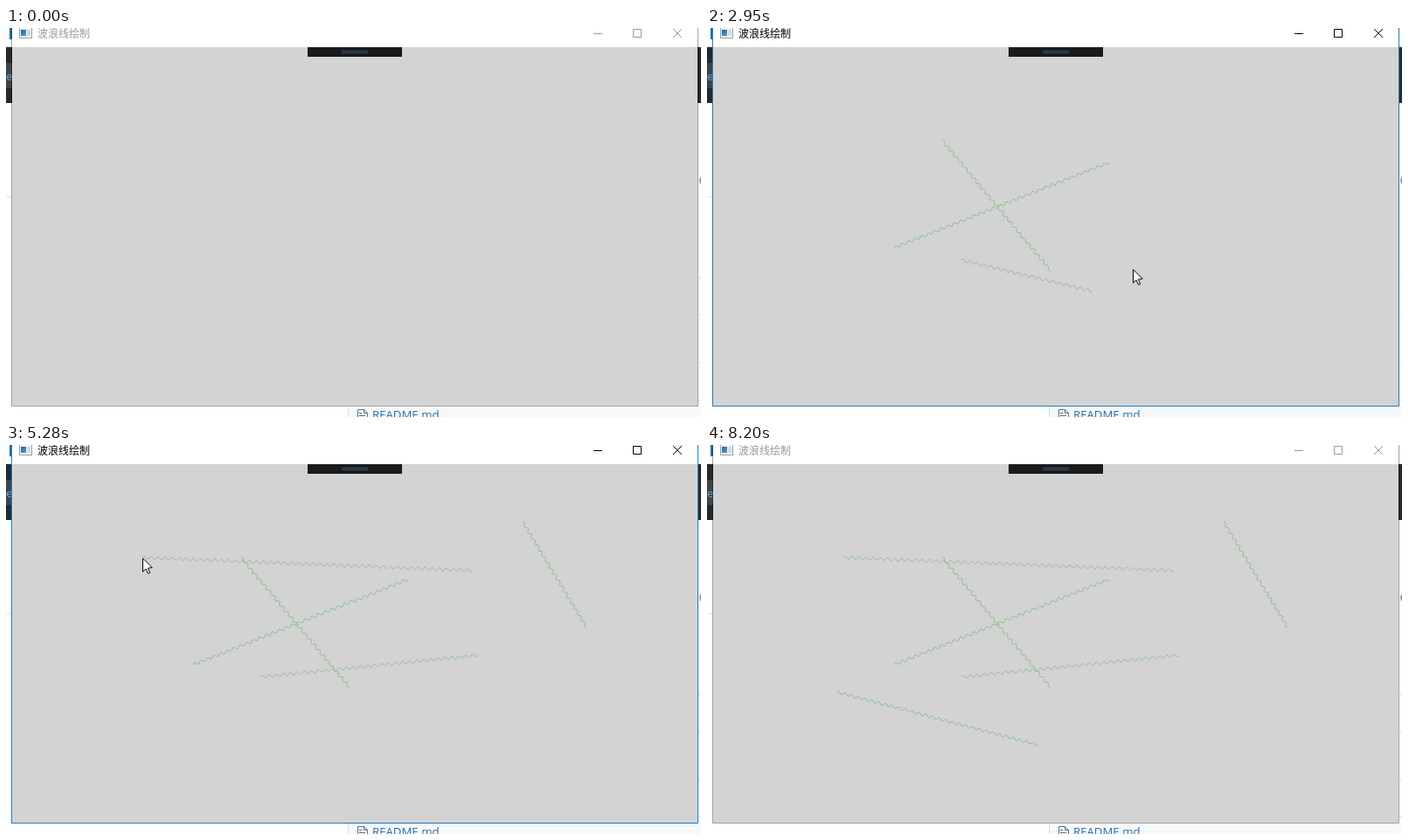
Recreate the animation shown at these times as an HTML page with a canvas. Size 795x446 px, loop 8270 ms.

```html
<!DOCTYPE html>
<html lang="zh">
<head>
<meta charset="utf-8">
<title>波浪线绘制</title>
<style>
html, body { margin: 0; width: 100%; height: 100%; overflow: hidden; background: #fff; }
canvas { display: block; }
</style>
</head>
<body>
<canvas id="stage" width="795" height="446"></canvas>
<script>
const ctx = document.getElementById('stage').getContext('2d');
const LOOP = 8270, TICK = 64;
const CLICK = 400, BLUR = 8200;

// The pointer's journey: each gesture goes on from where the last one ended
const gestures = [];
let spot = [640, 418];
function gesture(draws, from, to, x, y, ...via) {
  const steps = Math.round((to - from) / TICK);
  const path = [[from - TICK, ...spot], ...via, [to, x, y]];
  gestures.push({ from, steps, step: (to - from) / steps, draws, path });
  spot = [x, y];
}
const move = (...args) => gesture(false, ...args);
const drag = (...args) => gesture(true, ...args);

move(60, 395, 214, 252);
drag(460, 820, 460, 154);
move(1130, 1320, 393, 278);
drag(1640, 1960, 269, 129);
move(2210, 2390, 291, 266, [2210, 270, 146]);
drag(2640, 3090, 540, 241, [2830, 400, 316]);
move(3160, 3440, 664, 209);
drag(3510, 3760, 591, 88);
move(3960, 4080, 534, 144);
drag(4330, 5280, 156, 129, [4710, 240, 125], [4773, 238, 124]);
move(5530, 5720, 148, 283);
drag(5860, 7130, 379, 344, [5980, 275, 330], [6050, 350, 265], [6114, 336, 245],
  [6300, 230, 182], [6558, 56, 303], [6622, 61, 314], [6800, 130, 374]);
move(7440, 7830, 830, 462);

// Smooth curve through the way points, at rest at both ends
function along(path, t) {
  const last = path.length - 1;
  if (t <= path[0][0]) return path[0].slice(1);
  if (t >= path[last][0]) return path[last].slice(1);
  let i = 0;
  while (t > path[i + 1][0]) i++;
  const a = path[i], b = path[i + 1], d = b[0] - a[0], u = (t - a[0]) / d;
  const slope = (j, c) => j === 0 || j === last ? 0
    : (path[j + 1][c] - path[j - 1][c]) / (path[j + 1][0] - path[j - 1][0]);
  return [1, 2].map(c =>
    a[c] + (b[c] - a[c]) * u * u * (3 - 2 * u) +
    d * u * (1 - u) * (slope(i, c) * (1 - u) - slope(i + 1, c) * u));
}

function rect(x, y, w, h, color) {
  ctx.fillStyle = color;
  ctx.fillRect(x, y, w, h);
}

function text(str, x, y, font, color) {
  ctx.font = font;
  ctx.fillStyle = color;
  ctx.fillText(str, x, y);
}

function stroke(color, path) {
  ctx.strokeStyle = color;
  ctx.lineWidth = 1;
  ctx.stroke(new Path2D(path));
}

function drawPage() {
  rect(0, 0, 795, 446, '#fff');
  rect(4, 0, 3, 13, '#256f9e');
  rect(0, 21, 795, 1, '#dcdcdc');
  rect(0, 22, 795, 64, '#24292e');
  rect(0, 40, 7, 29, '#3f4448');
  text('se', -6, 60, '13px "Open Sans", sans-serif', '#6aa9d6');
  rect(0, 193, 7, 1, '#e1e4e8');
  for (const y of [286, 328, 383, 426]) rect(792, y, 3, 1, '#dfe2e5');
  ctx.beginPath();
  ctx.arc(799, 175, 6, 0, 7);
  ctx.fillStyle = '#999';
  ctx.fill();
  rect(391, 434, 404, 12, '#f6f8fa');
  rect(391, 434, 1, 12, '#d9dde1');
  stroke('#59718a', 'M402.5 450V437.5H409.5L413.5 441.5V450M409.5 437.5V441.5H413.5M404 441.5H407M404 444.5H411');
  text('README.md', 419, 448, '13.2px "Open Sans", sans-serif', '#2a6ca8');
}

function drawWindow(active) {
  const ink = active ? '#000' : '#999';
  // The idle border is see-through
  rect(6, 0, 786, 434, active ? '#1a7fc9' : 'rgba(0, 0, 0, 0.36)');
  rect(7, 0, 784, 22, '#fff');
  rect(7, 22, 784, 411, '#d3d3d3');

  rect(15, 0, 15, 12, '#9aa0a6');
  rect(16, 0, 13, 11, '#f1f3f5');
  const blue = ctx.createLinearGradient(17, 2, 23, 9);
  blue.addColorStop(0, '#2b62a8');
  blue.addColorStop(1, '#4ba3c3');
  rect(17, 2, 6, 7, blue);
  rect(24, 2, 4, 7, '#d5dade');
  text('波浪线绘制', 36, 11, '12px "Noto Sans CJK SC", "Noto Sans CJK", sans-serif', ink);

  rect(672, 6, 10, 1, ink);
  stroke(ink, 'M717.5 1.5h9v9h-9zM763 1l10 10M773 1l-10 10');

  rect(345, 22, 108, 11, '#1b1b1c');
  for (const y of [26, 28]) rect(384, y, 30, 1, '#35556d');
}

function drawWave([x0, y0], [x1, y1]) {
  const dx = x1 - x0, dy = y1 - y0, len = Math.hypot(dx, dy);
  if (len < 2) return;
  const halves = 2 * Math.max(1, Math.round(len / 8));
  const w = len / halves;
  ctx.save();
  ctx.translate(x0, y0);
  ctx.rotate(Math.atan2(dy, dx));
  ctx.beginPath();
  ctx.moveTo(0, 0);
  for (let i = 0; i < halves; i++) {
    const h = i % 2 ? 2 : -2;
    ctx.bezierCurveTo((i + 0.27) * w, h, (i + 0.73) * w, h, (i + 1) * w, 0);
  }
  ctx.strokeStyle = '#84bb84';
  ctx.lineWidth = 0.85;
  ctx.stroke();
  ctx.restore();
}

const ARROW = 'M.5 .9V16.3L4 13L6.5 18.4L8.7 17.5L6.4 12.2L11.2 11.6Z';
function drawPointer([x, y]) {
  ctx.save();
  ctx.translate(Math.round(x), Math.round(y));
  ctx.fillStyle = '#fff';
  ctx.fill(new Path2D(ARROW));
  stroke('#000', ARROW);
  ctx.restore();
}

function draw(t) {
  drawPage();
  drawWindow(t >= CLICK && t < BLUR);
  let pointer = null;
  for (const { from, steps, step, draws, path } of gestures) {
    if (t < from) break;
    const k = Math.min(steps, Math.floor((t - from) / step + 0.2));
    const now = from + k * step;
    pointer = along(path, now);
    // The line trails the pointer by one step until it settles
    if (draws) drawWave(path[0].slice(1), k === steps ? pointer : along(path, now - step));
  }
  if (pointer) drawPointer(pointer);
}

const start = performance.now();
function tick() {
  draw((performance.now() - start) % LOOP);
  requestAnimationFrame(tick);
}
tick();
</script>
</body>
</html>
```
